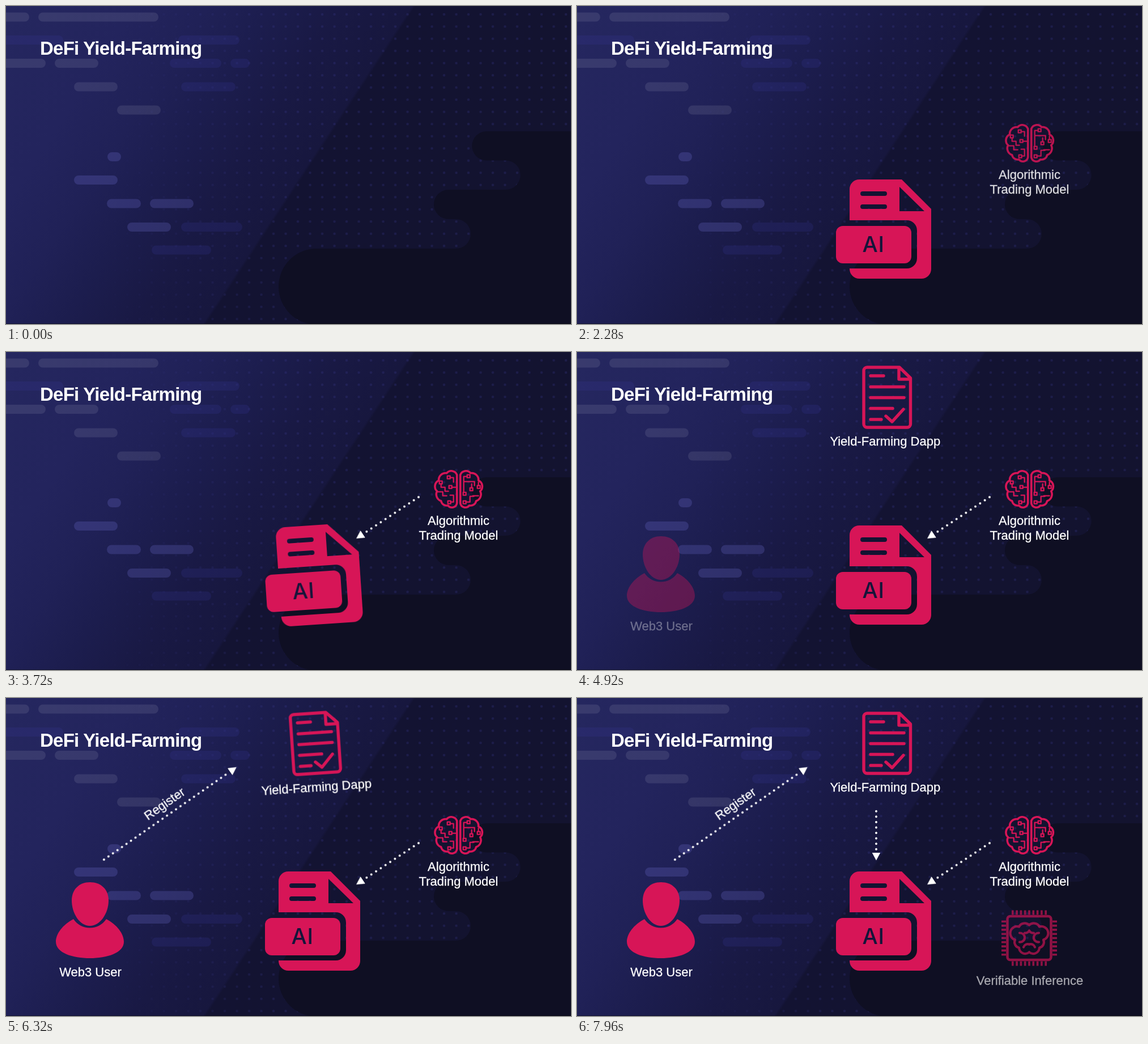
Animation, 997 px wide and 561 px high, one loop 8 s. Source, as an HTML page:

```html
<!DOCTYPE html>
<html lang="en">
<head>
<meta charset="utf-8">
<title>DeFi Yield-Farming</title>
<style>
  :root { --red: #d71557; --sine: cubic-bezier(.37, 0, .63, 1); }
  html, body { margin: 0; width: 100%; height: 100%; overflow: hidden; background: #13132f; }
  #stage { position: relative; width: 997px; height: 561px; overflow: hidden; }
  svg { position: absolute; inset: 0; display: block; }
  svg, .register { font: 22px "Liberation Sans", Arial, sans-serif; }
  .label { fill: #fff; stroke: #fff; stroke-width: .3; text-anchor: middle; }
  .title { font-size: 33px; font-weight: 700; letter-spacing: -.75px; fill: #fff; }
  .badge { font: 500 38.5px Inter, sans-serif; letter-spacing: .5px; fill: #15153a; text-anchor: middle; }
  .solid { fill: var(--red); }
  .line { fill: none; stroke: var(--red); stroke-linecap: round; stroke-linejoin: round; }

  /* Icons fade in, some of them wag later */
  .icon { transform-box: fill-box; transform-origin: center; }
  #agent { animation: show-agent 8s linear infinite, wag-agent 8s var(--sine) infinite; }
  #model { animation: show-model 8s linear infinite; }
  #dapp { animation: show-dapp 8s linear infinite, wag-dapp 8s var(--sine) infinite; }
  #user { animation: show-user 8s linear infinite; }
  #chip { animation: show-chip 8s linear infinite; }
  @keyframes show-agent { 0%, 13% { opacity: 0 } 20%, 100% { opacity: 1 } }
  @keyframes show-model { 0%, 22.5% { opacity: 0 } 29.5%, 100% { opacity: 1 } }
  @keyframes show-dapp { 0%, 49.5% { opacity: 0 } 56.5%, 100% { opacity: 1 } }
  @keyframes show-user { 0%, 59% { opacity: 0 } 66%, 100% { opacity: 1 } }
  @keyframes show-chip { 0%, 95% { opacity: 0 } 100% { opacity: .714 } }
  @keyframes wag-agent {
    0%, 41%, 48.5%, 100% { transform: rotate(0deg) }
    41.625%, 44.125%, 46.625% { transform: rotate(-4deg) }
    42.875%, 45.375%, 47.875% { transform: rotate(4deg) }
  }
  @keyframes wag-dapp {
    0%, 76%, 83.5%, 100% { transform: rotate(0deg) }
    76.625%, 79.125%, 81.625% { transform: rotate(-4deg) }
    77.875%, 80.375%, 82.875% { transform: rotate(4deg) }
  }

  /* Dotted arrows grow from their first dot, carrying the head along */
  .arrow {
    position: absolute; left: var(--x); top: var(--y); width: var(--len); height: 0;
    transform-origin: 0 0; transform: rotate(var(--turn));
    animation: 8s var(--sine) infinite;
  }
  .arrow::before {
    content: ""; position: absolute; top: -4px; height: 8px;
    left: calc(var(--gap) / -2); right: 17px;
    background: radial-gradient(circle, #fff 1.5px, #fff0 2.2px) 0 0 / var(--gap) 8px repeat-x;
  }
  .arrow::after {
    content: ""; position: absolute; right: 0; top: -7.5px; width: 14px; height: 15px;
    background: #fff; clip-path: polygon(0 0, 100% 50%, 0 100%);
  }
  #feed { --x: 728px; --y: 256px; --len: 132px; --turn: 146.4deg; --gap: 10px; animation-name: draw-feed; }
  #signup { --x: 173px; --y: 285px; --len: 285px; --turn: -34.9deg; --gap: 9.7px; animation-name: draw-signup; }
  #call { --x: 527.5px; --y: 199.5px; --len: 86.5px; --turn: 90deg; --gap: 9.57px; animation-name: draw-call; }
  @keyframes draw-feed {
    0%, 32.24% { width: 8px; opacity: 0 } 32.25% { width: 8px; opacity: 1 }
    41%, 100% { width: var(--len); opacity: 1 }
  }
  @keyframes draw-signup {
    0%, 65.99% { width: 8px; opacity: 0 } 66% { width: 8px; opacity: 1 }
    73.5%, 100% { width: var(--len); opacity: 1 }
  }
  @keyframes draw-call {
    0%, 84.74% { width: 8px; opacity: 0 } 84.75% { width: 8px; opacity: 1 }
    93.5%, 100% { width: var(--len); opacity: 1 }
  }

  .register {
    position: absolute; left: 280px; top: 187px; line-height: 26px; color: #fff;
    -webkit-text-stroke: .3px #fff;
    transform: translate(-50%, -50%) rotate(-34.9deg);
    animation: write 8s var(--sine) infinite;
  }
  @keyframes write {
    0%, 68.5% { clip-path: inset(0 100% 0 0) }
    76%, 100% { clip-path: inset(0 0 0 0) }
  }
</style>
</head>
<body>
<div id="stage">
  <svg width="997" height="561" viewBox="0 0 997 561">
    <defs>
      <linearGradient id="night" gradientUnits="userSpaceOnUse" x1="0" y1="0" x2="797" y2="525">
        <stop offset="0" stop-color="#25275f"/>
        <stop offset=".2" stop-color="#23245d"/>
        <stop offset=".31" stop-color="#202157"/>
        <stop offset=".41" stop-color="#1c1d4e"/>
        <stop offset=".52" stop-color="#191944"/>
        <stop offset=".627" stop-color="#17173e"/>
        <stop offset=".632" stop-color="#131332"/>
        <stop offset="1" stop-color="#13132f"/>
      </linearGradient>
      <linearGradient id="reveal">
        <stop offset=".15" stop-color="#000"/>
        <stop offset=".5" stop-color="#fff"/>
      </linearGradient>
      <mask id="right"><rect width="997" height="561" fill="url(#reveal)"/></mask>
      <pattern id="grid" width="21.5" height="21.5" x="9.8" y="4" patternUnits="userSpaceOnUse">
        <circle cx="10.75" cy="10.75" r="2.3" fill="#3c3c90" opacity=".27"/>
      </pattern>
    </defs>

    <rect width="997" height="561" fill="url(#night)"/>
    <rect width="997" height="561" fill="url(#grid)" mask="url(#right)"/>
    <g fill="none" stroke-width="16" stroke-linecap="round">
      <path stroke="#fff" stroke-opacity=".09" d="M-9 19.5H33M65 19.5H261M-9 101H62M94 101H155M128 142.5H189M204 183.5H265"/>
      <path stroke="#7474dc" stroke-opacity=".23" d="M187 266H195M128 307H189M186 348.5H230M262 348.5H323M222 390H283"/>
      <path stroke="#3a3a9c" stroke-opacity=".2" d="M-9 60H93M312 60H404M297 101H372M404 101H422M317 142.5H397M317 390H409M265 430.5H354"/>
    </g>
    <path fill="#0f0f23" d="M997 221H848a25.75 25.75 0 0 0 0 51.5H882a25.75 25.75 0 0 1 0 51.5H781a26 26 0 0 0 0 52H794a26 26 0 0 1 0 52H548a67 67 0 0 0 0 134H997Z"/>
    <path stroke="#000" stroke-opacity=".4" d="M0 560.5H997"/>

    <text class="title" x="60" y="86">DeFi Yield-Farming</text>

    <g id="agent" class="icon">
      <path class="solid" fill-rule="evenodd" d="M481 378V323a17 17 0 0 1 17-17H573L625 358V464a17 17 0 0 1-17 17H498a17 17 0 0 1-17-17V463H582a18 18 0 0 0 18-18V396a18 18 0 0 0-18-18Z
        M569 319V362H613Z
        M504 327H543a4 4 0 0 1 0 8H504a4 4 0 0 1 0-8Z
        M504 350H543a4 4 0 0 1 0 8H504a4 4 0 0 1 0-8Z"/>
      <rect class="solid" x="457" y="388" width="133" height="66" rx="12"/>
      <text class="badge" x="523" y="434">AI</text>
    </g>

    <g id="model">
      <g class="line" transform="translate(798.7 241.7)" stroke-width="3.6">
        <path id="half" d="M-3-25A10.5 10.5 0 0 0-21-28A12 12 0 0 0-35-15A11.5 11.5 0 0 0-38 4A12 12 0 0 0-31 21A10 10 0 0 0-19 29A9 9 0 0 0-3 25Z"/>
        <use href="#half" transform="scale(-1 1)"/>
        <g stroke-width="2.3">
          <path d="M-15-23h-5v5h5zM-34-14h5v5h-5zM-17-6h5v5h-5zM-19 21h5v5h-5z"/>
          <path d="M-15-20H-9V-12M-31-9V-3H-24V4H-18M-12-3H-4M-36 5H-28V12H-21M-14 23H-9V11H-15"/>
          <path d="M15-25h5v5h-5zM20-2h5v5h-5zM33-6h5v5h-5zM8 6h5v5h-5zM8 21h5v5h-5z"/>
          <path d="M15-22H9V6M9-13H28V-6M23-2V-9M35-6V-12M25 12H35M13 23H20V13H27"/>
        </g>
      </g>
      <text class="label" x="798.5" y="304.5">Algorithmic</text>
      <text class="label" x="798.5" y="331">Trading Model</text>
    </g>

    <g id="dapp" class="icon">
      <g class="line" stroke-width="5.4">
        <path d="M512 27H569L588.5 46V127a6 6 0 0 1-6 6H512a6 6 0 0 1-6-6V33a6 6 0 0 1 6-6ZM568 28V48H588"/>
        <path d="M518 42H541M518 61.5H577M518 80.5H577M518 99.5H557M518 119H537M545 113L556 123L576 101"/>
      </g>
      <text class="label" x="543.8" y="165">Yield-Farming Dapp</text>
    </g>

    <g id="user">
      <path class="solid" d="M148 325C168 325 181 338 181 357C181 380 166 402 148 402S116 380 116 357C116 338 129 325 148 325Z"/>
      <path class="solid" d="M119 390C100 400 88 416 88 430C88 450 118 459 148 459S208 450 208 430C208 416 196 400 177 390C170 400 160 405.5 148 405.5S126 400 119 390Z"/>
      <text class="label" x="149" y="491">Web3 User</text>
    </g>

    <g id="chip">
      <g class="line" transform="translate(798 423.5)" stroke-width="4.5">
        <rect x="-38.5" y="-38.5" width="77" height="77" rx="5"/>
        <g stroke-width="8" stroke-dasharray="3.6 3.7" stroke-linecap="butt">
          <path id="pins" d="M-31-45H31.2"/>
          <use href="#pins" transform="rotate(90)"/>
          <use href="#pins" transform="rotate(180)"/>
          <use href="#pins" transform="rotate(270)"/>
        </g>
        <g id="lobe" stroke-width="4.2">
          <path d="M0-23A11 10 0 0 0-18-20A12 12 0 0 0-25 3A10 10 0 0 0-18 17A11 11 0 0 0 0 25"/>
          <path d="M-17-9A9 9 0 0 1-8-2A8 8 0 0 1-17 7M0 11A8 8 0 0 0-10 16M0-13A8 8 0 0 1-8-9"/>
        </g>
        <use href="#lobe" transform="scale(-1 1)"/>
      </g>
      <text class="label" x="799" y="506">Verifiable Inference</text>
    </g>
  </svg>

  <div id="feed" class="arrow"></div>
  <div id="signup" class="arrow"></div>
  <div id="call" class="arrow"></div>
  <div class="register">Register</div>
</div>
</body>
</html>
```
